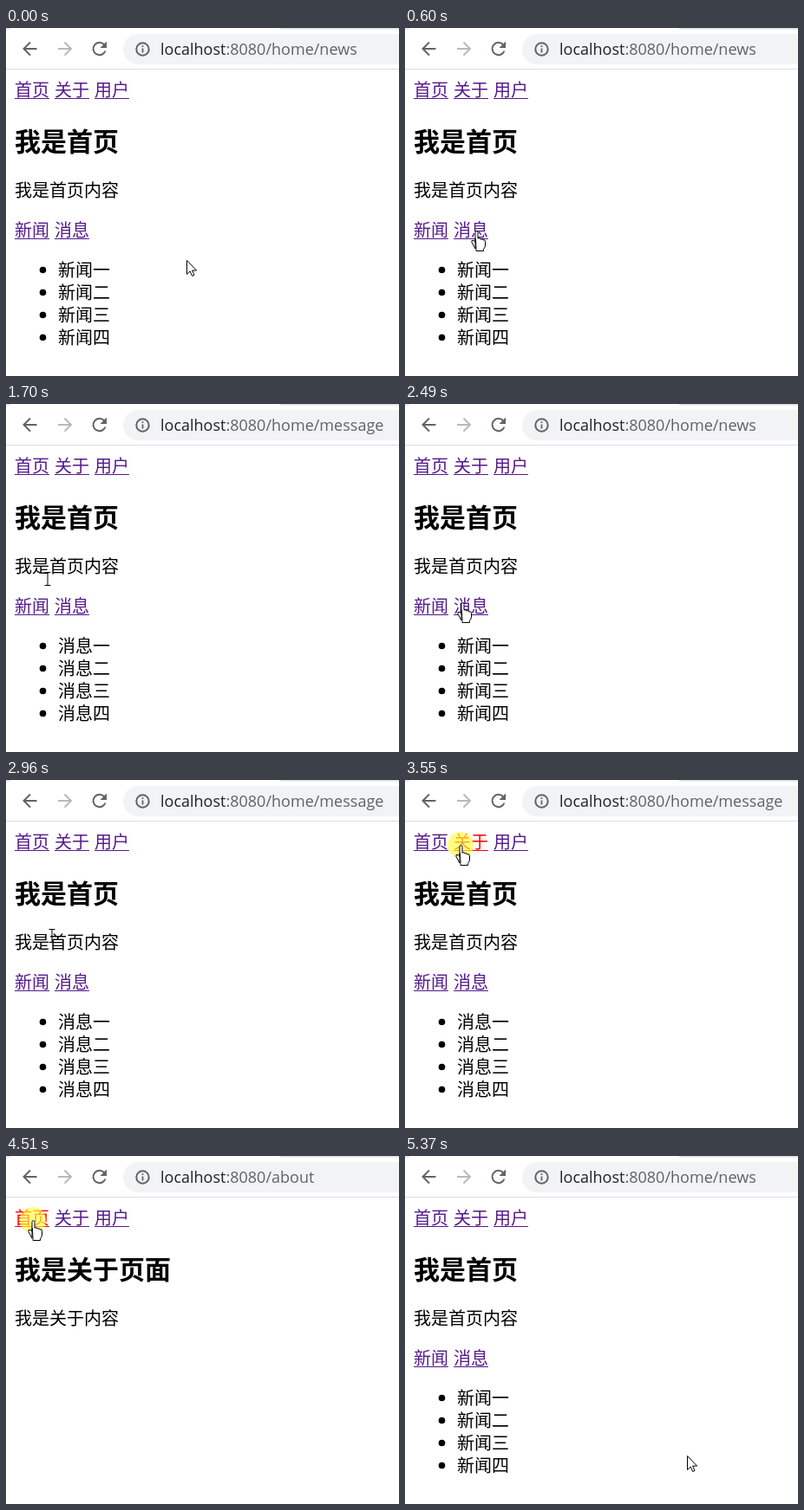
Recreate the animation shown at these times as an HTML page. Size 453 by 402 pixels, loop 5.9 s.

```html
<!DOCTYPE html>
<html lang="zh-CN">
<head>
<meta charset="utf-8">
<style>
html, body { margin: 0; width: 100%; height: 100%; overflow: hidden; background: #fff; }
svg { display: block; }
text { font-family: "Noto Sans CJK SC", "Noto Sans CJK", sans-serif; font-size: 20px; font-weight: 350; white-space: pre; }
.url { font-family: "Open Sans", "Noto Sans", sans-serif; font-size: 18px; font-weight: 400; fill: #5f6368; }
.host { fill: #202124; }
.title { font-size: 30px; font-weight: 700; }
.link { fill: #551a8b; }
.link.active { fill: #f00; }
.icon { fill: none; stroke: #5f6368; stroke-width: 2; }
.cursor { fill: #fff; stroke: #000; stroke-width: 1; stroke-linejoin: round; }
</style>
</head>
<body>
<svg width="453" height="402" viewBox="0 0 453 402">
  <path d="M0 0H6Q5 1.500 0 1.500ZM315 0H453V1.500H320Q316 1.500 315 0Z" fill="#dee1e6"/>
  <rect y="47" width="453" height="1" fill="#dadce0"/>
  <rect x="135" y="7" width="340" height="35" rx="17.5" fill="#f1f3f4"/>
  <path id="back" class="icon" d="M35.500 24H21M28 16.500L20.500 24L28 31.500"/>
  <use href="#back" transform="translate(95.500 0) scale(-1 1)" opacity=".45"/>
  <path class="icon" d="M113 19A7.200 7.200 0 1 0 114.500 26.500"/>
  <path d="M116 15.500V23H108.500Z" fill="#5f6368"/>
  <circle class="icon" cx="157.500" cy="24.500" r="7.200" stroke-width="1.700"/>
  <path d="M157.500 20.300v1.800M157.500 23.500v5" stroke="#5f6368" stroke-width="1.800"/>
  <text class="url" x="178" y="31"><tspan class="host">localhost</tspan><tspan id="path"></tspan></text>
  <g id="nav"></g>
  <text id="title" class="title" x="10" y="141.500"></text>
  <text id="intro" x="10" y="195"></text>
  <g id="home"></g>
  <circle id="halo" r="15" fill="#ffff40" fill-opacity=".65"/>
  <path id="hand" class="cursor" d="M-1 13V2.500q0-2 1.500-2t1.500 2V9q3-1 3 1q3-1 3 1q2.500-1 2.500 1.500V17q0 2-2 4.500V23.500H0V21.500Q-1-2.500 -1 21L-5 13.500q-1-3 2-2z"/>
  <path id="arrow" class="cursor" d="M.5.5v16l3.700-3.500 2.400 5.500 2.400-1-2.400-5.400h5z"/>
  <path id="beam" class="cursor" style="fill:none" d="M-3.500-7.500H3.500M0-7.500V7.500M-3.500 7.500H3.500"/>
</svg>
<script>
const LOOP = 5900;
const STEP = 67.4; // the pointer is redrawn at this pace
const LINE = 26, LINK = 40, PITCH = 46;
const START = { x: 208, y: 268 };
const $ = id => document.getElementById(id);

const moves = [
  { from: 30, to: 600, x: 82, y: 234 },
  { from: 860, to: 1070, x: 78, y: 190 },
  { from: 1080, to: 1300, x: 86, y: 100 },
  { from: 1350, to: 1890, x: 42, y: 219 },
  { from: 2350, to: 2490, x: 66, y: 229 },
  { from: 2880, to: 3370, x: 64, y: 75, bow: -15 },
  { from: 3900, to: 4310, x: 31, y: 74 },
  { from: 4785, to: 5320, x: 325, y: 346 }
];

const clicks = [
  { press: 730, load: 860, link: "消息", page: "message" },
  { press: 2090, load: 2280, link: "新闻", page: "news" },
  { press: 2690, load: 2830, link: "消息", page: "message" },
  { press: 3500, load: 3700, link: "关于", page: "about" },
  { press: 4510, load: 4710, link: "首页", page: "news" }
];

function add(parent, tag, attrs, text) {
  const node = document.createElementNS("http://www.w3.org/2000/svg", tag);
  for (const key in attrs) node.setAttribute(key, attrs[key]);
  if (text) node.textContent = text;
  parent.append(node);
  return node;
}

const links = {};
function addLinks(parent, names, mid) {
  names.forEach((name, i) => {
    const x = 10 + PITCH * i;
    const g = links[name] = add(parent, "g", { class: "link" });
    add(g, "text", { x, y: mid + 7 }, name);
    add(g, "rect", { x, y: mid + 9, width: LINK, height: 1 });
  });
}
addLinks($("nav"), ["首页", "关于", "用户"], 72);
addLinks($("home"), ["新闻", "消息"], 234);

const numerals = [..."一二三四"];
const items = numerals.map((_, i) => {
  const mid = 280 + LINE * i;
  add($("home"), "circle", { cx: 42.5, cy: mid - 0.5, r: 3.8 });
  return add($("home"), "text", { x: 60, y: mid + 7 });
});

function pointerAt(ms) {
  const t = Math.floor(ms / STEP + 0.2) * STEP;
  let { x, y } = START;
  for (const m of moves) {
    const p = Math.min(1, Math.max(0, (t - m.from) / (m.to - m.from)));
    const eased = 1 - (1 - p) ** 2;
    x += (m.x - x) * eased + (m.bow || 0) * Math.sin(Math.PI * eased);
    y += (m.y - y) * eased;
  }
  return [Math.round(x), Math.round(y)];
}

function cursorAt(x, y, about) {
  const within = (left, mid, width, height) =>
    x >= left && x <= left + width && Math.abs(y - mid) <= height / 2;
  const onLinks = (count, mid) =>
    within(10, mid, PITCH * count - 6, LINE + 4) && (x - 10) % PITCH <= LINK;
  if (onLinks(3, 72) || (!about && onLinks(2, 234))) return "hand";
  const onText = within(10, 131, about ? 180 : 120, 36) || within(10, 188, 120, LINE + 2);
  const onList = !about && within(60, 319, 60, 4 * LINE);
  return onText || onList ? "beam" : "arrow";
}

function place(id, x, y, visible) {
  $(id).setAttribute("transform", `translate(${x} ${y})`);
  $(id).setAttribute("visibility", visible ? "visible" : "hidden");
}

function render(t) {
  const last = clicks.filter(c => c.load <= t).pop();
  const page = last ? last.page : "news";
  const about = page === "about";
  const topic = about ? "关于" : "首页";
  const word = page === "message" ? "消息" : "新闻";

  $("path").textContent = ":8080/" + (about ? "" : "home/") + page;
  $("title").textContent = "我是" + topic + (about ? "页面" : "");
  $("intro").textContent = "我是" + topic + "内容";
  $("home").style.display = about ? "none" : "";
  items.forEach((item, i) => item.textContent = word + numerals[i]);

  const click = clicks.find(c => c.press <= t && t < c.load);
  for (const name in links)
    links[name].classList.toggle("active", !!click && click.link === name);

  const [x, y] = pointerAt(t);
  const kind = cursorAt(x, y, about);
  for (const id of ["hand", "arrow", "beam"]) place(id, x, y, id === kind);
  place("halo", x, y, click);
}

const began = performance.now();
function tick() {
  render((performance.now() - began) % LOOP);
  requestAnimationFrame(tick);
}
tick();
</script>
</body>
</html>
```
